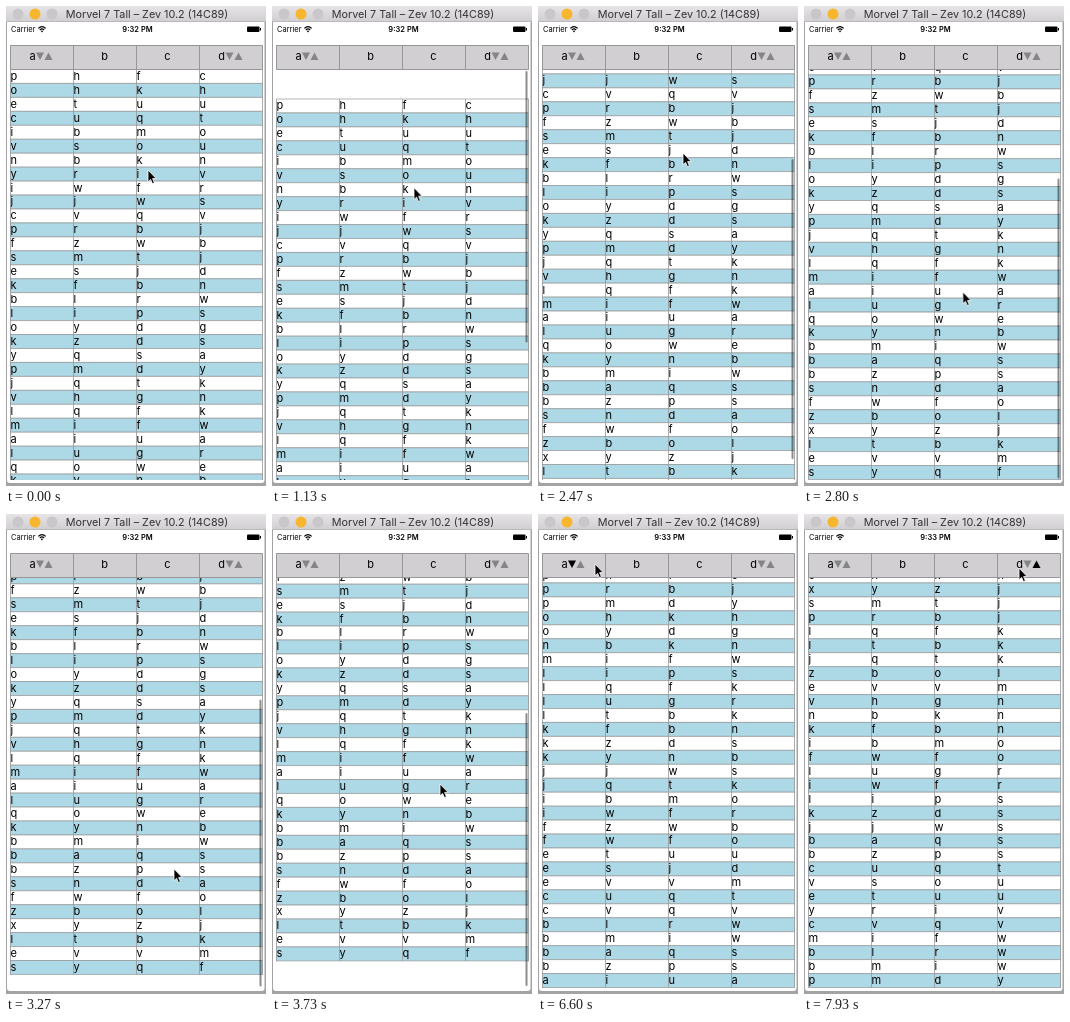
An HTML page that plays this animation: 260x480 px, repeating every 8 s.

```html
<!DOCTYPE html>
<html lang="en">
<head>
<meta charset="utf-8">
<title>Sortable table</title>
<style>
html, body { margin: 0; width: 100%; height: 100%; overflow: hidden; background: #a3a2a4; }
svg { display: block; width: 260px; height: 480px; font-family: Inter, Roboto, sans-serif; }
.mid { text-anchor: middle; }
.status { font-size: 7.5px; }
.bold { font-weight: 600; }
.head, .list { font-size: 11px; }
.grid { stroke: #979799; fill: none; }
.arrow { fill: #858587; }

#scroll, #bar, #cursor, .list, .arrow, .clock { animation: 8s linear infinite; }
#scroll { animation-name: scroll; }
#bar { animation-name: bar; }
#cursor { animation-name: cursor; }
.list, .arrow, .clock { animation-timing-function: step-end; }
#plain { animation-name: plain; }
#aUp { animation-name: aUp; }
#aDown { animation-name: aDown; }
#dUp { animation-name: dUp; }
.a-up { animation-name: aUpInk; }
.a-down { animation-name: aDownInk; }
.d-up { animation-name: dUpInk; }
.early { animation-name: early; }
.late { animation-name: late; }

@keyframes scroll {
  0%, 9.125% { transform: translateY(0); animation-timing-function: ease-out; }
  20% { transform: translateY(46px); }
  21.875% { transform: translateY(46.5px); animation-timing-function: ease-out; }
  25%, 26.875% { transform: translateY(0); }
  30.875% { transform: translateY(-121px); animation-timing-function: ease-out; }
  35%, 38.125% { transform: translateY(-148px); }
  40.875% { transform: translateY(-161px); }
  46.625% { transform: translateY(-174.6px); }
  50% { transform: translateY(-180px); animation-timing-function: ease-out; }
  54.375%, 100% { transform: translateY(-148px); }
}
@keyframes bar {
  0%, 9.125% { transform: translateY(65px); height: 301px; opacity: 0; animation-timing-function: ease-out; }
  9.2% { opacity: 1; }
  20% { transform: translateY(65px); height: 255px; }
  21.875% { transform: translateY(65px); height: 253px; animation-timing-function: ease-out; }
  25%, 26.875% { transform: translateY(64px); height: 301px; }
  30.875% { transform: translateY(153px); height: 300px; animation-timing-function: ease-out; }
  35%, 38.125% { transform: translateY(172.5px); height: 300px; }
  40.875% { transform: translateY(185.5px); height: 287px; }
  46.625% { transform: translateY(199px); height: 273px; }
  50% { transform: translateY(204.5px); height: 268px; animation-timing-function: ease-out; }
  54.375% { transform: translateY(172.5px); height: 300px; }
  56.25% { opacity: 1; }
  59.375%, 100% { transform: translateY(172.5px); height: 300px; opacity: 0; }
}
@keyframes cursor {
  0%, .875% { transform: translate(142px, 164px); animation-timing-function: ease-in-out; }
  5.875%, 9.125% { transform: translate(142px, 121px); animation-timing-function: ease-out; }
  20% { transform: translate(142px, 215.5px); }
  21.875%, 22.5% { transform: translate(142px, 216px); animation-timing-function: ease-in-out; }
  26.875% { transform: translate(145px, 268px); }
  30.875%, 31.875% { transform: translate(145px, 147px); animation-timing-function: ease-in-out; }
  37.5%, 38.125% { transform: translate(168px, 379px); }
  40.875% { transform: translate(168px, 355px); }
  46.625% { transform: translate(168px, 270px); }
  50%, 53.125% { transform: translate(168px, 240px); animation-timing-function: ease-in-out; }
  62.5%, 82.5% { transform: translate(57px, 50px); animation-timing-function: ease-in-out; }
  92.5% { transform: translate(217px, 56px); animation-timing-function: step-end; }
  93.375%, 100% { transform: translate(215px, 54px); }
}
/* sort clicks at 5070, 6000 and 7800 ms */
@keyframes plain { 0% { visibility: visible; } 63.375%, 100% { visibility: hidden; } }
@keyframes aUp { 0% { visibility: hidden; } 63.375% { visibility: visible; } 75%, 100% { visibility: hidden; } }
@keyframes aDown { 0% { visibility: hidden; } 75% { visibility: visible; } 97.5%, 100% { visibility: hidden; } }
@keyframes dUp { 0% { visibility: hidden; } 97.5%, 100% { visibility: visible; } }
@keyframes aUpInk { 0% { fill: #858587; } 63.375% { fill: #000; } 75%, 100% { fill: #858587; } }
@keyframes aDownInk { 0% { fill: #858587; } 75% { fill: #000; } 97.5%, 100% { fill: #858587; } }
@keyframes dUpInk { 0% { fill: #858587; } 97.5%, 100% { fill: #000; } }
@keyframes early { 0% { visibility: visible; } 57.5%, 100% { visibility: hidden; } }
@keyframes late { 0% { visibility: hidden; } 57.5%, 100% { visibility: visible; } }
</style>
</head>
<body>
<svg viewBox="0 0 260 480">
  <defs>
    <linearGradient id="chrome" x2="0" y2="1">
      <stop stop-color="#e6e4e6"/><stop offset="1" stop-color="#d0ced0"/>
    </linearGradient>
    <clipPath id="view"><rect x="3" y="64" width="255" height="409.5"/></clipPath>
  </defs>

  <rect x="1" y="10" width="257.5" height="467" rx="3" fill="#fff"/>
  <rect width="260" height="16" fill="url(#chrome)"/>
  <path d="M0 15.5H260" stroke="#bab8ba"/>
  <circle cx="12" cy="8" r="5.5" fill="#c9c7c9"/>
  <circle cx="29" cy="8" r="5.5" fill="#f8b52e"/>
  <circle cx="46" cy="8" r="5.5" fill="#c9c7c9"/>
  <text class="mid" x="141" y="12" font-size="10.8" fill="#333">Morvel 7 Tall – Zev 10.2 (14C89)</text>

  <g class="status">
    <text x="5" y="26">Carrier</text>
    <g fill="none" stroke="#000" stroke-width="1.1">
      <path d="M32.3 22.4Q36 18.8 39.7 22.4M33.8 24Q36 21.9 38.2 24"/>
    </g>
    <path d="M34.8 25.1Q36 24 37.2 25.1L36 26.5Z"/>
    <text class="mid bold clock early" x="131.5" y="26">9:32 PM</text>
    <text class="mid bold clock late" x="131.5" y="26">9:33 PM</text>
    <rect x="241" y="20.5" width="12.5" height="5.5" rx="1"/>
    <rect x="254" y="22" width="1" height="2.5"/>
  </g>

  <g clip-path="url(#view)">
    <g id="scroll">
      <g class="list" id="plain"></g>
      <g class="list" id="aUp"></g>
      <g class="list" id="aDown"></g>
      <g class="list" id="dUp"></g>
    </g>
  </g>
  <rect id="bar" x="253.5" width="2" height="301" rx="1" fill="#000" fill-opacity=".45"/>

  <g class="head">
    <rect x="4" y="39" width="253" height="25" fill="#d1cfd1"/>
    <path class="grid" d="M4.5 39.5H256.5V63.5H4.5ZM67.5 39V64M130.5 39V64M193.5 39V64"/>
    <text class="mid" x="26.5" y="54">a</text>
    <text class="mid" x="98.5" y="54">b</text>
    <text class="mid" x="161.5" y="54">c</text>
    <text class="mid" x="215.5" y="54">d</text>
    <path class="arrow a-down" d="M30 46.5h8l-4 7.5z"/>
    <path class="arrow a-up" d="M38.5 54h8l-4-7.5z"/>
    <path class="arrow" d="M219.5 46.5h8l-4 7.5z"/>
    <path class="arrow d-up" d="M228.5 54h8l-4-7.5z"/>
  </g>

  <path id="cursor" d="M0 0V11.8L2.6 9.4 4.4 13.6 6.4 12.8 4.6 8.6H8.2Z" stroke="#fff" stroke-width=".8"/>
</svg>
<script>
const rowHeight = 13.95, top0 = 63.5, columns = [4, 67, 130, 193];
const rows = ('phfc ohkh etuu cuqt ibmo vsou nbkn yriv iwfr jjws cvqv prbj fzwb smtj esjd kfbn blrw ' +
  'lips oydg kzds yqsa pmdy jqtk vhgn lqfk mifw aiua lugr qowe kynb bmiw baqs bzps snda fwfo zbol ' +
  'xyzj ltbk evvm syqf').split(' ');

const sortBy = (list, col, dir = 1) =>
  [...list].sort((p, q) => dir * p[col].localeCompare(q[col]));

function rowMarkup(row, i) {
  const y = top0 + i * rowHeight;
  const fill = i % 2 ? '#add8e6' : '#fff';
  const letters = columns.map((x, c) => `<text x="${x + .5}" y="${y + 10.4}">${row[c]}</text>`);
  return `<rect x="4" y="${y}" width="253" height="${rowHeight}" fill="${fill}"/>` +
    `<path class="grid" stroke-width=".7" d="M4 ${y}H257M4 ${y + rowHeight}H257"/>` + letters.join('');
}

function fillList(id, list) {
  const bottom = top0 + list.length * rowHeight;
  const rules = [...columns, 256].map(x => `M${x + .5} ${top0}V${bottom}`).join('');
  document.getElementById(id).innerHTML =
    list.map(rowMarkup).join('') + `<path class="grid" stroke-width=".8" d="${rules}"/>`;
}

const aUp = sortBy(rows, 0), aDown = sortBy(aUp, 0, -1), dUp = sortBy(aDown, 3);
Object.entries({ plain: rows, aUp, aDown, dUp }).forEach(([id, list]) => fillList(id, list));
</script>
</body>
</html>
```
